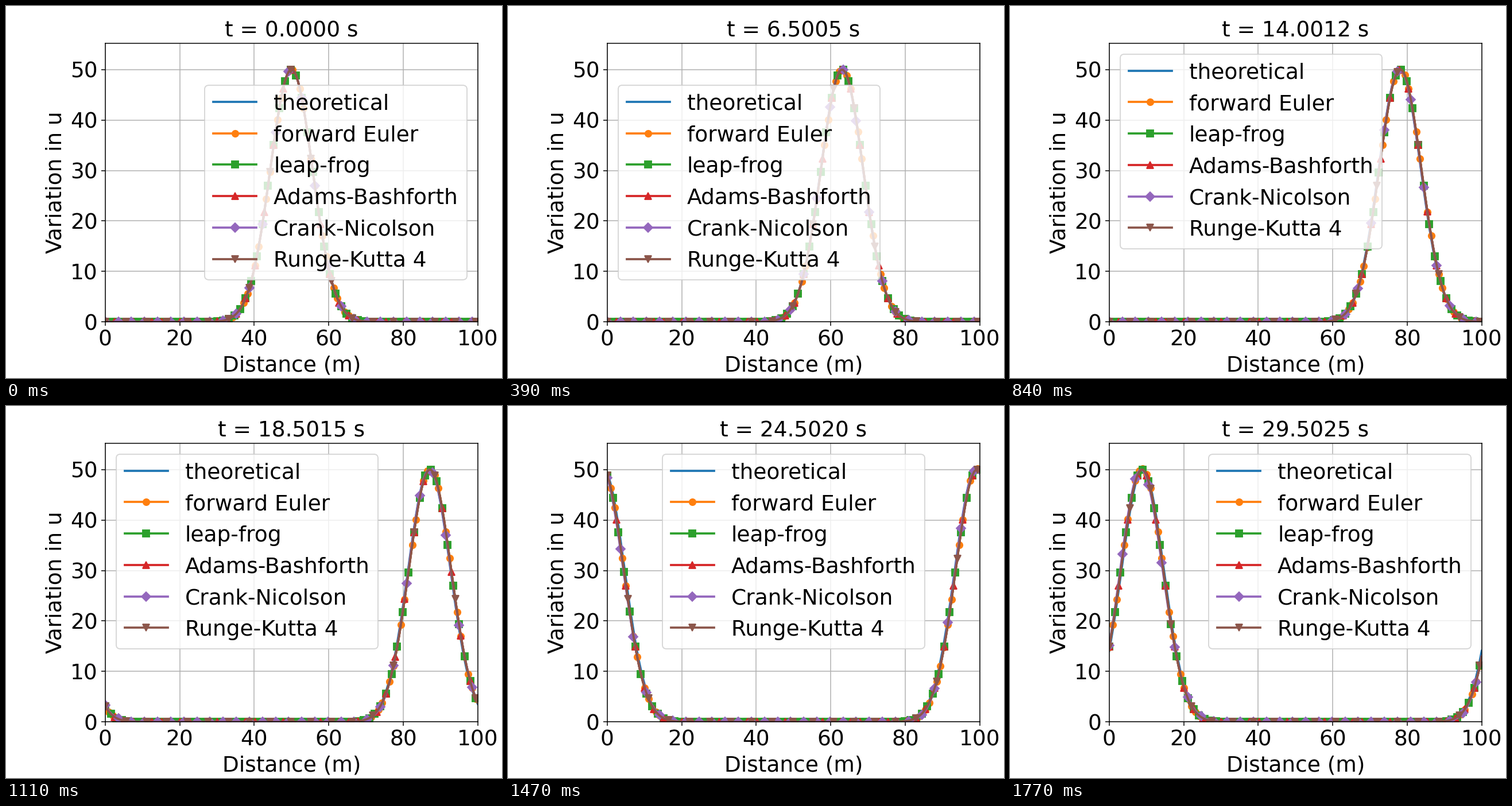
A matplotlib script that plays this animation: 864x648 px, repeating every 1.8 s.

```python
import numpy as np
import matplotlib.pyplot as plt
from matplotlib.animation import FuncAnimation

plt.rcParams.update({
    "font.family": "DejaVu Sans",
    "font.size": 20,
    "axes.titlesize": "medium",
    "lines.linewidth": 2,
})

SPEED = 2.0          # m/s
LENGTH = 100.0       # m
STEP = 0.5           # grid step used by the schemes
FRAMES = 60
SKIP = 200           # time steps per frame

x = np.linspace(0, LENGTH, 200)
times = np.linspace(0, 30, FRAMES * SKIP)
dt = times[1]


def pulse(d):
    return 50 * np.exp(-d**2 / 64)


# Amplification per time step of each Fourier mode
k = 2 * np.pi * np.fft.rfftfreq(x.size, STEP)
z = -1j * SPEED * dt * k
zc = -1j * SPEED * dt * np.sin(k * STEP) / STEP
exact = np.exp(z)
start = np.fft.rfft(pulse(x - 50))

schemes = [
    ("forward Euler", "o", 2, 1 + z),
    ("leap-frog", "s", 3, exact),
    ("Adams-Bashforth", "^", 5, exact),
    ("Crank-Nicolson", "D", 7, (1 + zc / 2) / (1 - zc / 2)),
    ("Runge-Kutta 4", "v", 11, exact),
]


def theory(t):
    d = (x - 50 - SPEED * t + LENGTH / 2) % LENGTH - LENGTH / 2
    return pulse(d)


def solve(gain, n):
    return np.fft.irfft(start * gain**n, x.size)


fig = plt.figure(figsize=(6.4, 4.8), dpi=135)
ax = fig.add_axes([0.2, 0.1506, 0.751, 0.7494])
ax.set_xlim(0, LENGTH)
ax.set_ylim(0, 1.1 * solve(1 + z, times.size - 1).max())
ax.set_xticks(range(0, 101, 20))
ax.set_yticks(range(0, 51, 10))
ax.set_xlabel("Distance (m)", labelpad=5)
ax.set_ylabel("Variation in u")
ax.grid(True)
title = ax.set_title("t = 0.0000 s")

ideal, = ax.plot(x, theory(0), label="theoretical")
lines = [ax.plot(x, solve(gain, 0), marker=marker, markevery=every, label=name)[0]
         for name, marker, every, gain in schemes]
ax.legend(loc="best", handleheight=0.83)


def update(frame):
    n = frame * SKIP
    ideal.set_ydata(theory(times[n]))
    for line, (*_, gain) in zip(lines, schemes):
        line.set_ydata(solve(gain, n))
    title.set_text(f"t = {times[n]:.4f} s")
    return [ideal, *lines, title]


anim = FuncAnimation(fig, update, frames=FRAMES, interval=30,
                     repeat=True, repeat_delay=0, blit=False)
plt.show()
```
